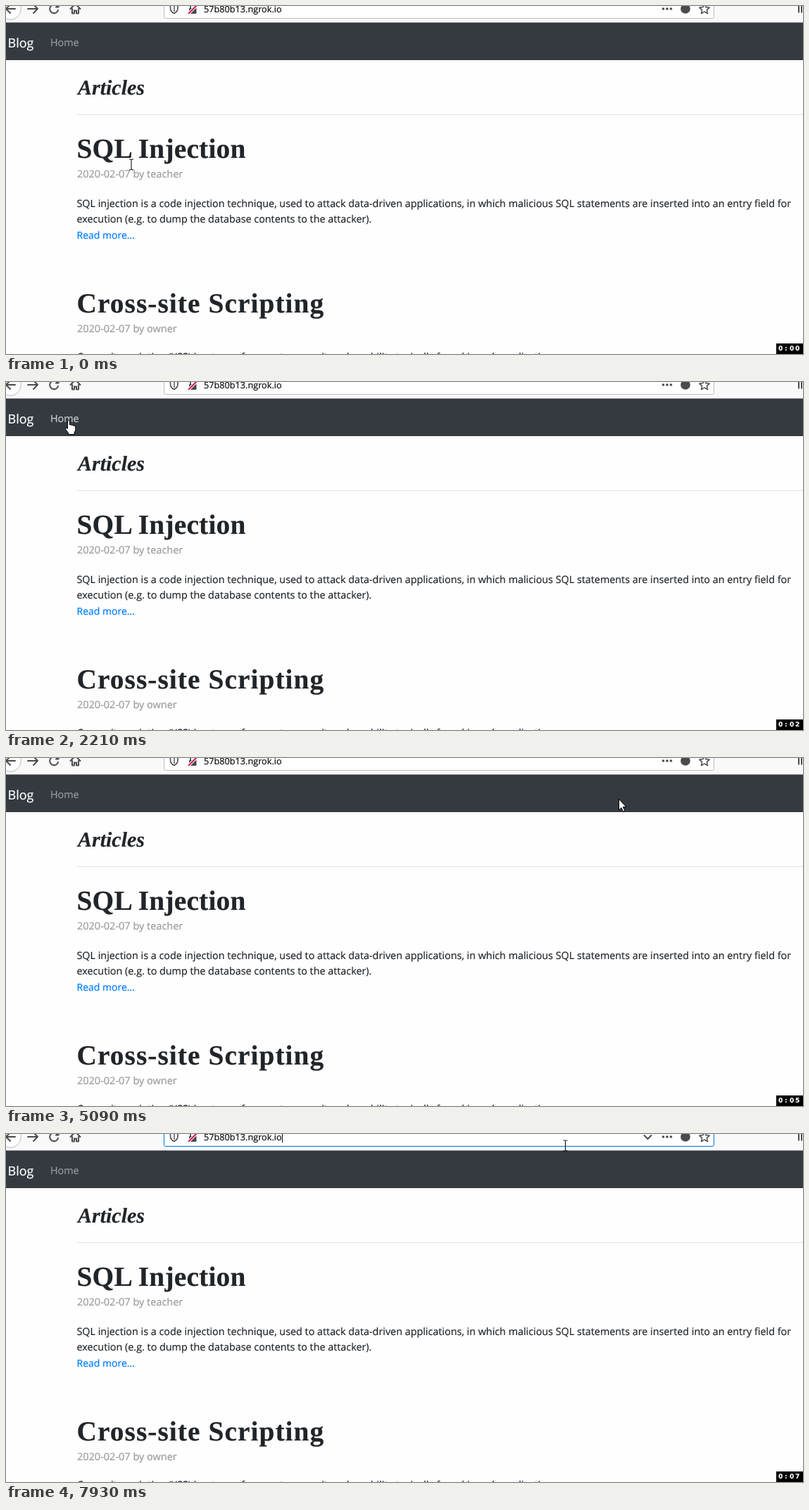
Animation of 1132 by 495 pixels, one loop 8000 ms. Source, as an HTML page:

```html
<!DOCTYPE html>
<html lang="en">
<head>
<meta charset="utf-8">
<title>Blog</title>
<style>
html, body { margin: 0; width: 100%; height: 100%; overflow: hidden; background: #fefefe; }
svg { display: block; width: 100%; height: 100%; }
text { font: 14.35px "Open Sans", "Noto Sans", sans-serif; color: #212529; fill: currentColor; stroke: currentColor; stroke-width: .2; text-rendering: geometricPrecision; white-space: pre; }
.title { font: bold 39.4px "Liberation Serif", serif; }
.section { font: italic bold 30px "Liberation Serif", serif; }
.meta { font-size: 14.5px; color: #999; }
.link { font-size: 14px; color: #007bff; }
.brand { font-size: 18px; color: #fff; }
.url { font-size: 12.7px; color: #0c0c0d; }
.clock { font: bold 9px "DejaVu Sans", sans-serif; color: #fff; }
.icon { fill: none; stroke: #4a4a4f; stroke-width: 2; stroke-linecap: round; stroke-linejoin: round; }
.fill { fill: #4a4a4f; }
.pointer { fill: #fff; stroke: #000; stroke-width: 1; stroke-linejoin: round; }
</style>
</head>
<body>
<svg viewBox="0 0 1132 495">
  <!-- browser toolbar -->
  <rect width="1132" height="23" fill="#f9f9fa"/>
  <rect y="23" width="1132" height="1" fill="#8f9194"/>
  <circle cx="6" cy="4" r="15.5" fill="#fdfdfd" stroke="#bdbdbf"/>
  <rect id="bar" x="224.5" y="-12.5" width="781" height="30" rx="2" fill="#fff"/>
  <g class="icon">
    <path d="M0 4H13M6 -2L0 4L6 10"/>
    <path d="M31 4H45M39 -2L45 4L39 10"/>
    <path id="reload" d="M73.3 1A6 6 0 1 0 74 6"/>
    <path id="reloadTip" d="M75 -2V2H70.5Z" fill="#4a4a4f" stroke-width="1"/>
    <path id="stop" d="M63 -1L73 9M73 -1L63 9"/>
    <path d="M91.5 4L98.5 -3L105.5 4M94 4V10.5H97V6.5H100V10.5H103V4"/>
    <path d="M233.5 -3H244V3Q244 8 238.7 10.5Q233.5 8 233.5 3Z" stroke-width="1.6"/>
    <path d="M239 -1V7.5" stroke-width="1.4"/>
    <path d="M262 3V0A3.2 3.2 0 0 1 268.4 0V3" stroke-width="1.8"/>
    <path id="chevron" d="M906.5 2L911.5 7L916.5 2"/>
    <path id="star" stroke-width="1.5"/>
    <path d="M1126 -2V9.5M1130 -2V9.5" stroke-linecap="butt"/>
  </g>
  <g class="fill">
    <rect x="260" y="3" width="10.5" height="8" rx="1"/>
    <circle cx="933.5" cy="4" r="1.8"/>
    <circle cx="939" cy="4" r="1.8"/>
    <circle cx="944.5" cy="4" r="1.8"/>
    <circle cx="965" cy="4" r="6.8"/>
  </g>
  <path d="M259 11L271.5 -1.5" stroke="#fff" stroke-width="4"/>
  <path d="M259 11L271.5 -1.5" stroke="#e0124f" stroke-width="2"/>
  <text class="url" x="281" y="9">57b80b13.ngrok.io</text>
  <rect id="caret" x="392" y="-2" width="1" height="14"/>

  <!-- page -->
  <rect y="24" width="1132" height="53" fill="#343a40"/>
  <text class="brand" x="2.5" y="59">Blog</text>
  <text id="home" x="63" y="57">Home</text>
  <text class="section" x="102" y="126">Articles</text>
  <rect x="101" y="154" width="1031" height="1" fill="#dfdfdf"/>
  <text class="title" x="100.5" y="215.5" letter-spacing=".2">SQL Injection</text>
  <text class="meta" x="101" y="244">2020-02-07 by teacher</text>
  <text x="100.5" y="285.5">SQL injection is a code injection technique, used to attack data-driven applications, in which malicious SQL statements are inserted into an entry field for</text>
  <text x="100.5" y="308">execution (e.g. to dump the database contents to the attacker).</text>
  <text class="link" x="100.5" y="331">Read more...</text>
  <text class="title" x="100.5" y="435.5" letter-spacing="1.05">Cross-site Scripting</text>
  <text class="meta" x="101" y="463.5">2020-02-07 by owner</text>
  <text x="100.5" y="504">Cross-site scripting (XSS) is a type of computer security vulnerability typically found in web applications.</text>

  <rect x="1094" y="480" width="38" height="15"/>
  <text id="clock" class="clock" x="1097 1106 1113 1121" y="490"></text>

  <g id="beam" fill="none" stroke="#000">
    <path d="M-3 -7.5H-1L0 -6.5L1 -7.5H3M0 -6.5V6.5M-3 7.5H-1L0 6.5L1 7.5H3"/>
  </g>
  <path id="arrow" class="pointer" d="M.5 .5V16L4 12.7L6.6 18.2L8.9 17.2L6.4 11.7H11Z"/>
  <path id="hand" class="pointer" d="M-1.5 1.5Q0 -.5 1.5 1.5V7Q3 5.8 4.2 7.5Q5.8 6.5 7 8.2Q9.5 7.5 9.8 10V14.5L8 18V20.5H-.5V18.5L-4.5 13Q-5 10.8 -3 11.2L-1.5 12.5Z"/>
</svg>
<script>
const $ = id => document.getElementById(id);
const LOOP = 8000;

// Pointer stops: time, x, y, shape
const stops = [
  [0, 178, 225.5, 'beam'], [120, 158, 190, 'beam'], [240, 130, 143, 'arrow'],
  [390, 118, 108, 'arrow'], [510, 102, 78, 'arrow'], [630, 90, 57, 'hand'], [750, 89, 54, 'hand'],
  [2330, 150, 58, 'arrow'], [2450, 258, 61, 'arrow'], [2600, 453, 49, 'arrow'],
  [2900, 458, 41, 'arrow'], [3020, 460, 34, 'arrow'],
  [3270, 459, 24, 'arrow'], [3390, 457.5, 14.5, 'beam'], [3510, 460.5, 9.5, 'beam'], [3750, 463.5, 11.5, 'beam'],
  [4270, 467.5, 14.5, 'beam'], [4390, 485, 42, 'arrow'], [4510, 560, 78, 'arrow'], [4630, 660, 90, 'arrow'],
  [4750, 760, 82, 'arrow'], [4870, 840, 66, 'arrow'], [4990, 870, 58, 'arrow'],
  [5240, 842, 36, 'arrow'], [5390, 841, 30, 'arrow'], [5540, 842.5, 13.5, 'beam'], [5660, 842.5, 9.5, 'beam'],
  [6200, 813, 18, 'arrow'], [6340, 795.5, 16.5, 'beam'], [6900, 788.5, 16.5, 'beam'], [7020, 787.5, 16.5, 'beam'],
  [7540, 799.5, 19.5, 'beam'], [7810, 797.5, 18.5, 'beam'], [7930, 794.5, 16.5, 'beam']
];
const seconds = [890, 1970, 3020, 4120, 5090, 6060, 7170];

const star = [...Array(10).keys()].map(i => {
  const r = i % 2 ? 3.6 : 7.6, a = i * Math.PI / 5;
  return (992 + r * Math.sin(a)) + ' ' + (4.5 - r * Math.cos(a));
});
$('star').setAttribute('d', 'M' + star.join('L') + 'Z');

const show = (id, on) => $(id).setAttribute('visibility', on ? 'visible' : 'hidden');

function draw(t) {
  const within = (a, b) => t >= a && t < b;
  const [, x, y, shape] = stops.findLast(s => s[0] <= t);
  for (const id of ['beam', 'arrow', 'hand']) show(id, id === shape);
  $(shape).setAttribute('transform', `translate(${x} ${y})`);

  $('home').style.color = shape === 'hand' ? '#ccced0' : '#999ca0';
  $('clock').textContent = '0:0' + seconds.filter(s => s <= t).length;

  const stopping = within(1390, 1870);
  show('reload', !stopping);
  show('reloadTip', !within(1150, 1990));
  show('stop', stopping);

  show('chevron', within(3390, 4390) || t >= 5540);
  const hover = within(3900, 4390) || t >= 6200;
  $('bar').setAttribute('stroke', t >= 7280 ? '#0078d7' : hover ? '#a0a0a2' : '#bdbdbf');
  show('caret', t >= 7810);
}

const start = performance.now();
function tick() {
  draw((performance.now() - start) % LOOP);
  requestAnimationFrame(tick);
}
tick();
</script>
</body>
</html>
```
